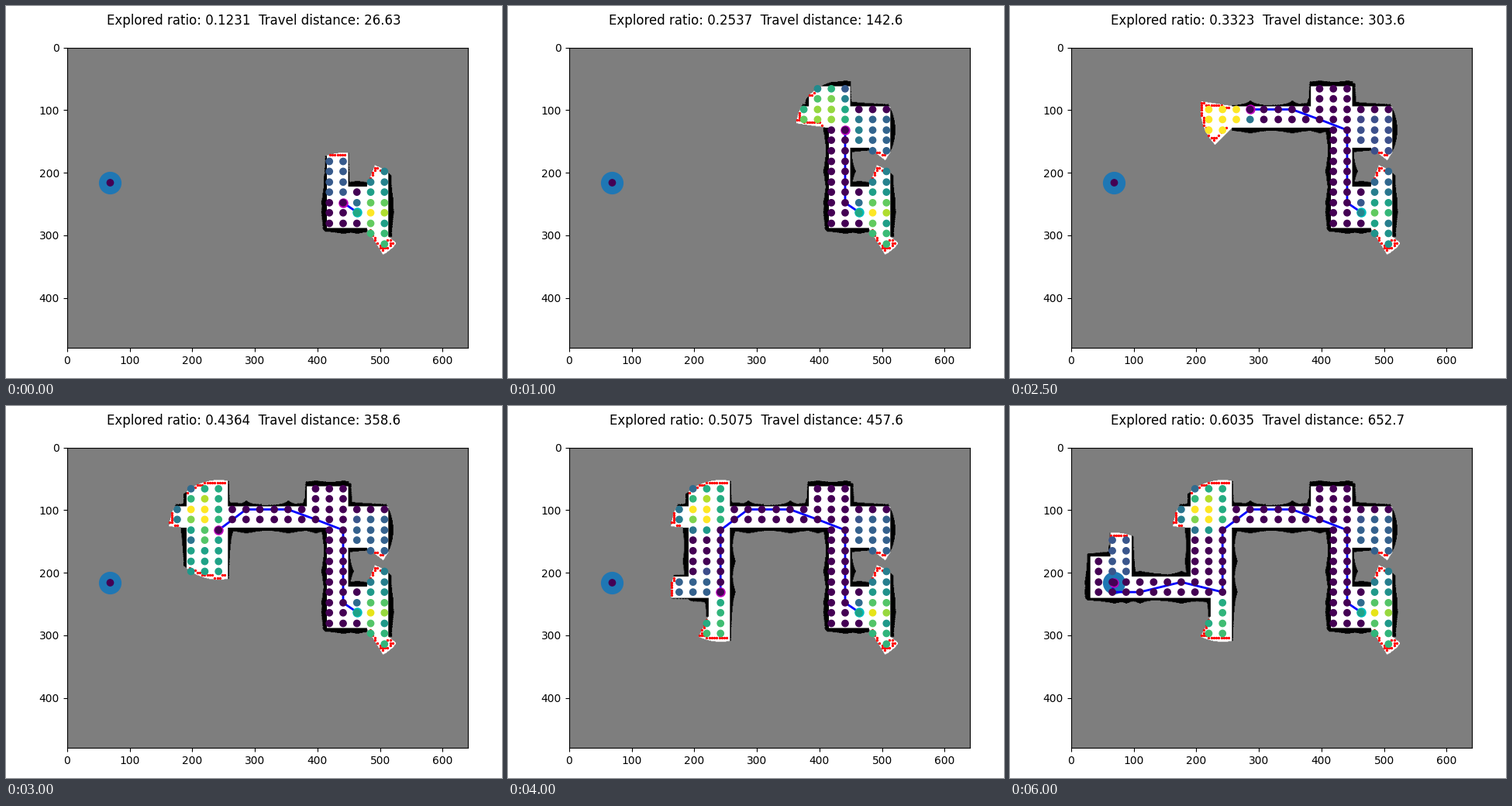
Recreate the animation shown at these times as a matplotlib script. Size 640 by 480 pixels, loop 6500 ms.

```python
import math

import matplotlib.pyplot as plt
import numpy as np
from matplotlib.animation import FuncAnimation

W, H = 640, 480
FREE, UNKNOWN, WALL = 255, 127, 1
SENSOR_RANGE = 80
FRONTIER_RANGE = 70
MIN_UTILITY = 5
MAX_HITS = 10
CELL = 4
TILE = 16

# Floor plan in tiles: left, top, right, bottom
ROOMS = [
    (26, 8, 28, 18), (24, 4, 28, 8), (26, 6, 32, 10), (8, 6, 28, 8),
    (12, 1, 16, 15), (14, 15, 16, 21), (10, 17, 16, 21), (2, 13, 16, 15),
    (2, 11, 6, 15), (4, 7, 6, 11), (26, 14, 32, 18), (30, 10, 32, 21),
    (30, 19, 36, 21),
]

GRID_X = np.linspace(0, W, 30).astype(int)[:-1]
GRID_Y = np.linspace(0, H, 30).astype(int)[:-1]
START, GOAL = (463, 263), (69, 216)

# Turning points of the route, as grid columns and rows
TURNS = [(20, 15), (20, 8), (16, 6), (13, 6), (11, 8), (11, 14), (8, 13),
         (5, 14), (4, 14)]

# Explored share at key steps
RATIO_KEYS = {0: 0.1231, 2: 0.2537, 5: 0.3323, 6: 0.4364, 8: 0.5075,
              10: 0.5801, 12: 0.6035}


def node(i, j):
    return int(GRID_X[i]), int(GRID_Y[j])


def plan():
    """Way points of each step; stretches beyond sensor range are halved."""
    legs = [[node(*TURNS[0])]]
    for (i0, j0), (i1, j1) in zip(TURNS, TURNS[1:]):
        if math.dist(node(i0, j0), node(i1, j1)) > SENSOR_RANGE:
            legs.append([node((i0 + i1 + 1) // 2, (j0 + j1 + 1) // 2)])
        legs.append([node(i1, j1)])
    return legs + [[node(3, 14), GOAL]]


def walk(x, y, x1, y1):
    """Grid cells on the line from (x, y) up to, not including, (x1, y1)."""
    dx, dy = abs(x1 - x), abs(y1 - y)
    sx = 1 if x1 > x else -1
    sy = 1 if y1 > y else -1
    error = dx - dy
    while (x, y) != (x1, y1) and 0 <= x < W and 0 <= y < H:
        yield x, y
        if error > 0:
            x += sx
            error -= 2 * dy
        else:
            y += sy
            error += 2 * dx


def scan(pos, truth, belief):
    x0, y0 = pos
    for angle in np.radians(np.arange(0, 360, 0.5)):
        x1 = round(x0 + SENSOR_RANGE * math.cos(angle))
        y1 = round(y0 + SENSOR_RANGE * math.sin(angle))
        hits = 0
        for x, y in walk(x0, y0, x1, y1):
            k = truth[y, x]
            if k == WALL:
                hits += 1
                if hits >= MAX_HITS:
                    break
            elif hits:
                break
            belief[y, x] = k


def find_frontiers(belief):
    coarse = belief.reshape(H // CELL, CELL, W // CELL, CELL).min(axis=(1, 3))
    rows, cols = coarse.shape
    unknown = np.pad((coarse == UNKNOWN).astype(int), 1)
    around = sum(unknown[a:a + rows, b:b + cols]
                 for a in range(3) for b in range(3) if (a, b) != (1, 1))
    edge = (coarse == FREE) & (around > 1) & (around < 8)
    return np.argwhere(edge)[:, ::-1] * CELL


def utility(pos, frontiers, belief):
    dist = np.hypot(*(frontiers - pos).T)
    near = frontiers[dist < FRONTIER_RANGE].tolist()
    count = sum(all(belief[y, x] == FREE for x, y in walk(*pos, *f))
                for f in near)
    return count if count > MIN_UTILITY else 0


def explore():
    truth = np.full((H, W), WALL)
    for left, top, right, bottom in ROOMS:
        truth[top * TILE - 1:bottom * TILE + 1,
              left * TILE - 1:right * TILE + 1] = FREE
    belief = np.full((H, W), UNKNOWN)
    scan(START, truth, belief)
    route, steps = [START], []
    for n, leg in enumerate(plan()):
        route = route + leg
        scan(route[-1], truth, belief)
        frontiers = find_frontiers(belief)
        nodes = [(int(x), int(y)) for x in GRID_X for y in GRID_Y
                 if belief[y, x] == FREE]
        values = [0 if p in route else utility(p, frontiers, belief)
                  for p in nodes]
        ratio = np.interp(n, list(RATIO_KEYS), list(RATIO_KEYS.values()))
        travel = sum(math.dist(a, b) for a, b in zip(route, route[1:]))
        title = f"Explored ratio: {ratio:.4g}  Travel distance: {travel:.4g}"
        steps.append((belief.copy(), frontiers, [GOAL] + nodes,
                      [0] + values, route, title))
    return steps


STEPS = explore()

fig, ax = plt.subplots(figsize=(6.4, 4.8), dpi=100)
heading = fig.suptitle("")


def draw(n):
    belief, frontiers, nodes, values, route, title = STEPS[n]
    ax.clear()
    ax.imshow(belief, cmap="gray", vmin=WALL, vmax=FREE)
    ax.axis((0, W, H, 0))
    ax.plot(*GOAL, "o", color="C0", markersize=20)
    ax.plot(*zip(*route), "b", linewidth=2)
    ax.plot(*route[-1], "mo", markersize=8)
    ax.plot(*route[0], "co", markersize=8)
    ax.scatter(*frontiers.T, c="r", s=2, zorder=3)
    ax.scatter(*zip(*nodes), c=values, zorder=5)
    heading.set_text(title)
    return []


draw(0)
fig.tight_layout()
anim = FuncAnimation(fig, draw, frames=len(STEPS), init_func=lambda: [],
                     interval=500, repeat=True, repeat_delay=0)
plt.show()
```
